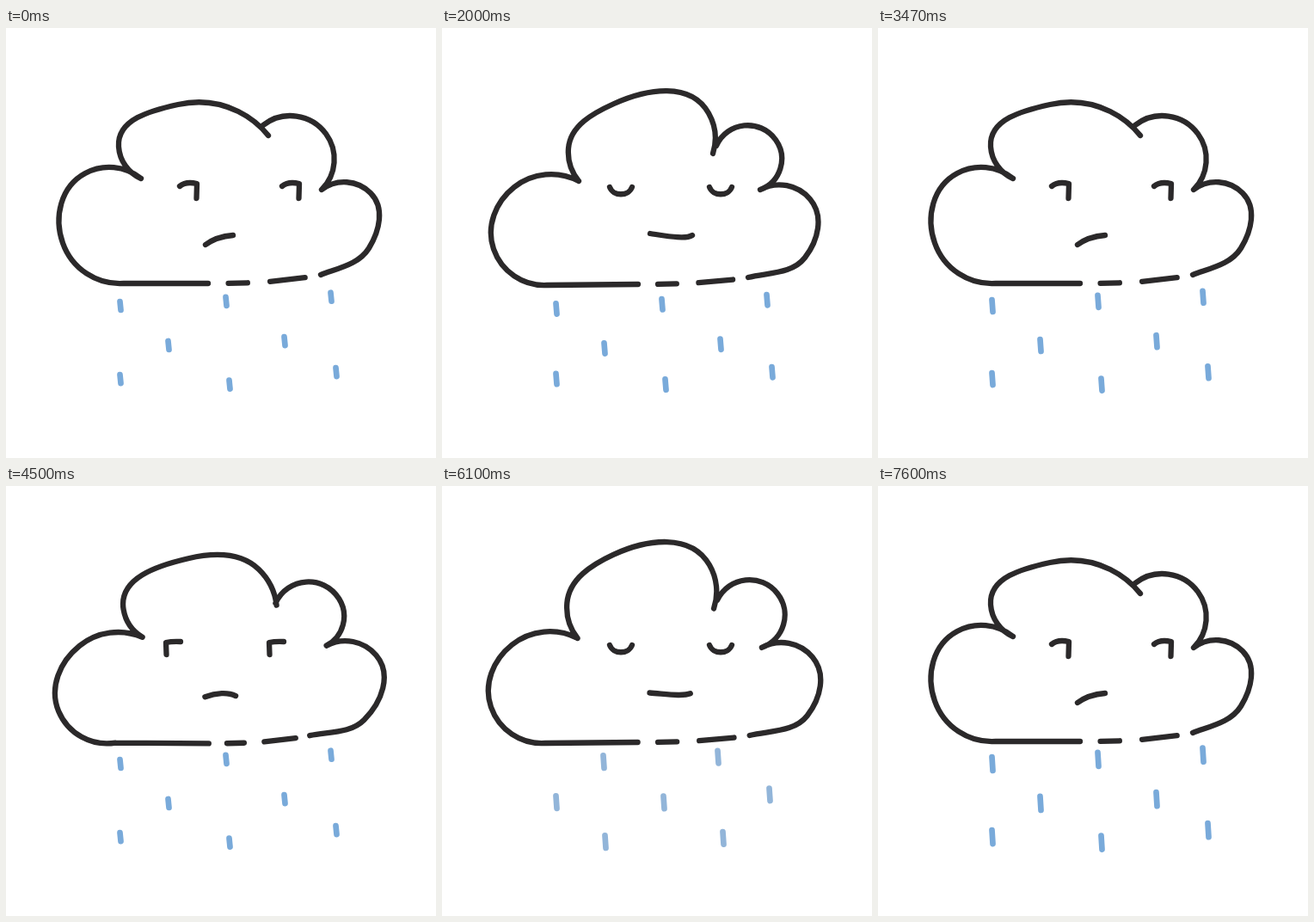
An HTML page that plays this animation: 500x500 px, repeating every 7.66 s.

```html
<!DOCTYPE html>
<html lang="en">
<head>
<meta charset="utf-8">
<title>Rain cloud</title>
<style>
  html, body { margin: 0; width: 100%; height: 100%; overflow: hidden; background: #fff; }
  svg { display: block; width: 100%; height: 100%; }
  path { fill: none; stroke: #2b292a; stroke-width: 6.3; stroke-linecap: round; stroke-linejoin: round; }
  #rain { stroke-width: 6.7; }
</style>
</head>
<body>
<svg viewBox="0 0 500 500">
  <path id="rain"/>
  <path id="cloud"/>
  <path id="face"/>
</svg>
<script>
const LOOP = 7660;
const BEAT = 400;
const TICKS = [0, 100, 200, 270, 330];
const CYCLE = 48;

const lerp = (a, b, k) => a + (b - a) * k;
const mix = (a, b, k) => a.map((p, i) => p.map((v, j) => lerp(v, b[i][j], k)));
const points = text => text.trim().split(/\s+/).map(p => p.split(',').map(Number));
const line = (a, b) => `M${a}L${b}`;

// Joins points with arcs that are exact for points on a circle.
function curve(pts) {
  const sides = pts.slice(1).map((p, i) => {
    const dx = p[0] - pts[i][0], dy = p[1] - pts[i][1];
    return { size: Math.hypot(dx, dy), angle: Math.atan2(dy, dx) };
  });
  const turn = (a, b) => Math.atan2(Math.sin(b - a), Math.cos(b - a));
  const last = sides.length - 1;
  const angles = pts.map((p, i) => {
    const a = sides[i - 1], b = sides[i];
    return a && b && a.angle + turn(a.angle, b.angle) * a.size / (a.size + b.size);
  });
  angles[0] = 2 * sides[0].angle - angles[1];
  angles[last + 1] = 2 * sides[last].angle - angles[last];

  const move = (p, angle, by) => [p[0] + Math.cos(angle) * by, p[1] + Math.sin(angle) * by];
  return sides.map((s, i) => {
    const bend = turn(angles[i], angles[i + 1]);
    const reach = s.size / (3 * Math.cos(bend / 4) ** 2);
    return `C${move(pts[i], angles[i], reach)} ${move(pts[i + 1], angles[i + 1], -reach)} ${pts[i + 1]}`;
  });
}

const stroke = pts => `M${pts[0]}` + curve(pts).join('');

// Base and left lobe to its cusp, top lobe to the notch, bump to its cusp, right lobe.
const flat = points(`235,297 137,297 66,250 92,169 157,175  131,138 200,89 270,97 305,125
  299,113 372,123 367,188  424,192 422,256 366,287`);
const wide = points(`236,300 125,299 60,265 84,190 159,176  138,145 215,83 300,97 317,142
  317,142 391,133 374,185  432,198 415,276 350,291`);
const leaning = points(`239,298 115,292 62,258 80,181 153,174  125,140 190,84 270,95 307,131
  307,131 370,115 366,184  424,190 419,252 377,283`);
const round = points(`228,298 122,299 60,257 84,185 159,178  147,140 200,88 310,99 315,146
  319,137 388,130 370,188  428,199 422,267 356,290`);
const tall = points(`235,297 130,297 64,255 90,178 149,173  118,140 175,85 270,84 316,141
  314,126 385,130 369,182  425,184 426,245 391,278`);

const swell = (pose, sx, sy) => pose.map(([x, y]) =>
  [250 + (x - 250) * sx, y < 190 ? 190 + (y - 190) * sy : y]);

const clouds = [
  { at: 0, pose: flat },
  { at: 10, pose: wide },
  { at: 13, pose: wide },
  { at: 16, pose: swell(wide, 1, 1.04) },
  { at: 20, pose: leaning },
  { at: 25, pose: round },
  { at: 28, pose: swell(round, 1.016, 1.08) },
  { at: 37, pose: tall },
  { at: 43, pose: flat }
];

const sulk = { eyes: 'sideways', left: 222, right: 341, mouth: points('232,252 240,246 252,242 264,241') };
const faces = [
  { at: 0, ...sulk },
  { at: 13, eyes: 'away', left: 186, right: 306, mouth: points('231,241 247,237 262,238 269,246') },
  { at: 20, eyes: 'lid', left: 213, right: 332, mouth: points('258,240 272,241 288,247 296,241') },
  { at: 25, eyes: 'arc', left: 208, right: 324, mouth: points('242,239 262,242 283,246 291,241') },
  { at: 37, eyes: 'lid', left: 207, right: 326, mouth: points('240,245 253,241 268,242 282,242') },
  { at: 43, ...sulk }
];

const eyeShapes = {
  sideways: x => `M${x - 20} 184q7 -6 20 -3l-.5 17`,
  away: x => `M${x + 17} 181q-10 -.5 -17 1l.5 14`,
  lid: x => `M${x - 11} 186.5q11 3 22 -.5M${x} 190v1.5`,
  arc: x => `M${x - 13} 185c4 11 22 11 26 0`
};

function between(keys, at) {
  const i = keys.findLastIndex(key => key.at <= at);
  const a = keys[i], b = keys[i + 1] || a;
  return { a, b, k: a === b ? 0 : (at - a.at) / (b.at - a.at) };
}

function cloudPath(step) {
  const { a, b, k } = between(clouds, step);
  const p = mix(a.pose, b.pose, k);
  const base = p[0], tail = p[14];
  const under = f => [lerp(base[0], tail[0], f), lerp(base[1], tail[1], f ** 2.5)];
  const right = curve([...p.slice(11), base]).slice(0, -1);
  return line(base, p[1]) + stroke(p.slice(1, 5)) + stroke(p.slice(4, 9)) + stroke(p.slice(9, 12))
    + `M${p[11]}` + right.join('') + line(under(0.18), under(0.35)) + line(under(0.55), under(0.86));
}

function facePath(step) {
  const { a, b, k } = between(faces, step);
  const { eyes, left, right } = k < 0.5 ? a : b;
  const [start, ...rest] = mix(a.mouth, b.mouth, k);
  return eyeShapes[eyes](left) + eyeShapes[eyes](right) + `M${start}C${rest.join(' ')}`;
}

const columns = [133, 189, 258, 324, 381];
const rows = [
  x => 323 - (x - 133) * 0.042,
  x => 369 - (x - 200) ** 2 / 3200,
  x => 415 - (x - 235) ** 2 / 1500
];
const fading = beat => beat > 3 && beat < 7;

// Two staggered sets of drops alternate; each drop lengthens over the beat.
function rainPath(beat) {
  const half = 5 + 3 * Math.sqrt(beat / 7);
  const fall = beat < 3 ? 4 * Math.sin(beat * Math.PI / 3) : 0;
  let d = '';
  columns.forEach((column, c) => rows.forEach((row, r) => {
    if ((c + r) % 2 !== Number(fading(beat))) return;
    const x = column + (r - 1) * Math.min(c, 3);
    const y = row(x) + (r < 2 ? fall : 0);
    d += line([x - 0.5, y - half], [x + 0.5, y + half]);
  }));
  return d;
}

function rainColor(beat) {
  if (!fading(beat)) return '#79aada';
  return beat === 5 ? '#ababab' : '#92b5d9';
}

const [rain, cloud, face] = ['rain', 'cloud', 'face'].map(id => document.getElementById(id));

function draw(frame) {
  const step = frame % CYCLE, beat = frame % 8;
  cloud.setAttribute('d', cloudPath(step));
  face.setAttribute('d', facePath(step));
  rain.setAttribute('d', rainPath(beat));
  rain.style.stroke = rainColor(beat);
}

const frameAt = t =>
  Math.floor(t / BEAT) * TICKS.length + TICKS.filter(x => x <= t % BEAT).length - 1;

const start = performance.now();
let shown = -1;
function tick() {
  const frame = frameAt((performance.now() - start) % LOOP);
  if (frame !== shown) draw(shown = frame);
  requestAnimationFrame(tick);
}
tick();
</script>
</body>
</html>
```
